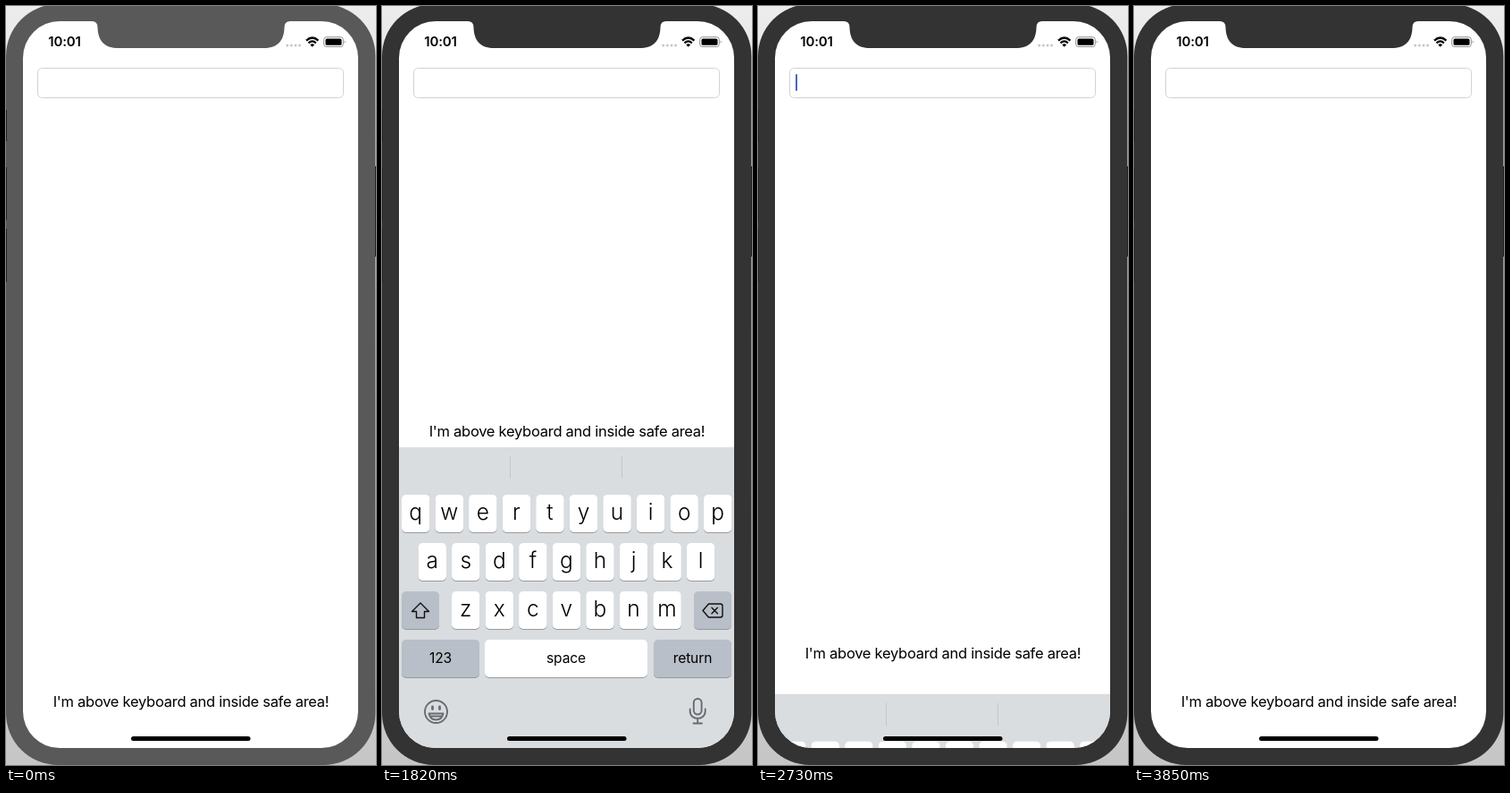
Animation, 414 px wide and 848 px high, one loop 4.27 s. Source, as an HTML page:

```html
<!DOCTYPE html>
<html lang="en">
<head>
<meta charset="utf-8">
<title>Keyboard and safe area</title>
<style>
  html, body { margin: 0; width: 100%; height: 100%; overflow: hidden; background: #e4e4e4; }
  svg { display: block; width: 414px; height: 848px; font-family: Inter, Roboto, sans-serif; }
  .icon { fill: none; stroke: #111; stroke-width: 1.4; stroke-linejoin: round; stroke-linecap: round; }
  .soft { stroke: #686b70; stroke-width: 1.9; }
  .letter { font-size: 24.5px; font-weight: 300; }
  .word { font-size: 15.6px; letter-spacing: -.15px; }
</style>
</head>
<body>
<svg viewBox="0 0 414 848">
  <defs>
    <linearGradient id="backdrop" x2="0" y2="1">
      <stop offset="0" stop-color="#ececec"/>
      <stop offset="1" stop-color="#c6c6c6"/>
    </linearGradient>
    <clipPath id="screen"><rect x="19" y="17" width="375" height="812" rx="41"/></clipPath>
  </defs>
  <rect width="414" height="848" fill="url(#backdrop)"/>
  <rect class="body" x="0" y="-2" width="413.4" height="850" rx="58"/>
  <path d="M.5 116V151M.5 180V239M.5 249V308M413.5 179V280" stroke="#222"/>
  <g clip-path="url(#screen)">
    <rect x="19" y="17" width="375" height="812" fill="#fff"/>
    <rect x="35.5" y="69.5" width="342" height="33" rx="5" fill="#fff" stroke="#d2d2d2"/>
    <rect id="caret" x="42" y="76" width="2" height="19" rx="1" fill="#4c66b4"/>
    <text id="label" x="207" text-anchor="middle" font-size="16.5" letter-spacing="-.27">I'm above keyboard and inside safe area!</text>
    <g id="keyboard" text-anchor="middle"></g>
    <rect x="140" y="816" width="133.5" height="5" rx="2.5"/>
  </g>
  <path class="body" d="M96 16V17Q102.500 17 102.500 24C103 40 111 47 126 47H288C303 47 311 40 311.500 24Q311.500 17 318 17V16Z"/>
  <text x="65.500" y="45.300" text-anchor="middle" font-size="15" font-weight="600" letter-spacing="-.2">10:01</text>
  <path d="M314.700 44h.01m4.600 0h.01m4.600 0h.01m4.600 0h.01" stroke="#c8c8c8" stroke-width="3" stroke-linecap="round"/>
  <path d="M336 38.600Q342.700 32.400 349.400 38.600M338.500 41.300Q342.700 37.600 346.900 41.300" fill="none" stroke="#000" stroke-width="2.200"/>
  <path d="M340.300 43.200Q342.700 41.300 345.100 43.200L342.700 45.700Z"/>
  <rect x="355.700" y="34.700" width="21.600" height="10.800" rx="2.900" fill="none" stroke="#8f8f8f"/>
  <rect x="357.500" y="36.500" width="18" height="7.200" rx="1.500"/>
  <path d="M378.700 38.200Q380.600 40 378.700 42Z" fill="#8f8f8f"/>
</svg>
<script>
const FRAME = 70, LOOP = 4270, FOCUS = 980;
const KEYBOARD_HEIGHT = 336, LABEL_TRAVEL = 302;
const sessions = [{ show: 1015, hide: 1880 }, { show: 2688, hide: 3277 }];
const find = selector => document.querySelector(selector);

function key(x, row, width, content, fill = '#fff') {
  const y = 53 + row * 54;
  const box = (top, color) => `<rect x="${x}" y="${top}" width="${width}" height="42" rx="5" fill="${color}"/>`;
  return box(y + 1, '#979a9f') + box(y, fill) + content;
}

function letters(text, left, row) {
  return [...text].map((char, i) => {
    const x = left + i * 37.55;
    return key(x, row, 31.5, `<text class="letter" x="${x + 15.75}" y="${81 + row * 54}">${char}</text>`);
  }).join('');
}

const word = (text, x) => `<text class="word" x="${x}" y="241">${text}</text>`;
const icon = (path, extra = '') => `<path class="icon ${extra}" d="${path}"/>`;
const GREY = '#b9bfc8';

find('#keyboard').innerHTML = `
  <rect x="19" width="375" height="${KEYBOARD_HEIGHT}" fill="#d9dde0"/>
  <path d="M143.500 10V35M268.500 10V35" stroke="#c3c7cb"/>
  ${letters('qwertyuiop', 22, 0)}${letters('asdfghjkl', 40.5, 1)}${letters('zxcvbnm', 78, 2)}
  ${key(22, 2, 42, icon('M43 174L52.500 183.500H47.500V190.500H38.500V183.500H33.500Z'), GREY)}
  ${key(349, 2, 42, icon('M365.500 175H378.500Q381 175 381 177.500V187.500Q381 190 378.500 190H365.500L359 182.500ZM369 179.300L375.400 185.700M375.400 179.300L369 185.700'), GREY)}
  ${key(22, 3, 87, word('123', 65.5), GREY)}
  ${key(115, 3, 182, word('space', 206))}
  ${key(304, 3, 87, word('return', 347.5), GREY)}
  <circle class="icon soft" cx="60.500" cy="295.500" r="12.500"/>
  <path d="M56.500 290v2.500M64.500 290v2.500" class="icon soft" style="stroke-width:2.800"/>
  ${icon('M52.500 297.500H68.500Q67 304.500 60.500 304.500T52.500 297.500M54 300.500H67', 'soft')}
  <rect class="icon soft" x="348.800" y="281" width="8.800" height="17.500" rx="4.400"/>
  ${icon('M344.700 292.500V295C344.700 305.500 361.700 305.500 361.700 295V292.500M353.200 303V308.500M348.500 308.500H358', 'soft')}`;

// Critically damped spring: 0 to 1 in about half a second.
function spring(ms) {
  if (ms <= 0) return 0;
  const x = Math.sqrt(1000 / 3) * ms / 1000;
  return ms > 520 ? 1 : 1 - (1 + x) * Math.exp(-x);
}

// The caret holds, then fades, and leaves with the keyboard.
function caretOpacity(t, { show, hide }) {
  if (t < show || t >= hide) return 0;
  return Math.max(0, Math.min(1, 1 - (t - show - 510) / 220));
}

function draw(t) {
  let raised = 0, caret = 0;
  for (const s of sessions) {
    raised += spring(t - s.show) - spring(t - s.hide);
    caret += caretOpacity(t, s);
  }
  find('#keyboard').setAttribute('transform', `translate(0 ${829 - KEYBOARD_HEIGHT * raised})`);
  find('#label').setAttribute('y', 783 - LABEL_TRAVEL * raised);
  find('#caret').setAttribute('opacity', caret);
  for (const part of document.querySelectorAll('.body')) {
    part.setAttribute('fill', t < FOCUS ? '#595959' : '#333');
  }
}

const start = performance.now();
function tick() {
  const elapsed = performance.now() - start + 8;
  draw(Math.floor(elapsed % LOOP / FRAME) * FRAME);
  requestAnimationFrame(tick);
}
tick();
</script>
</body>
</html>
```
